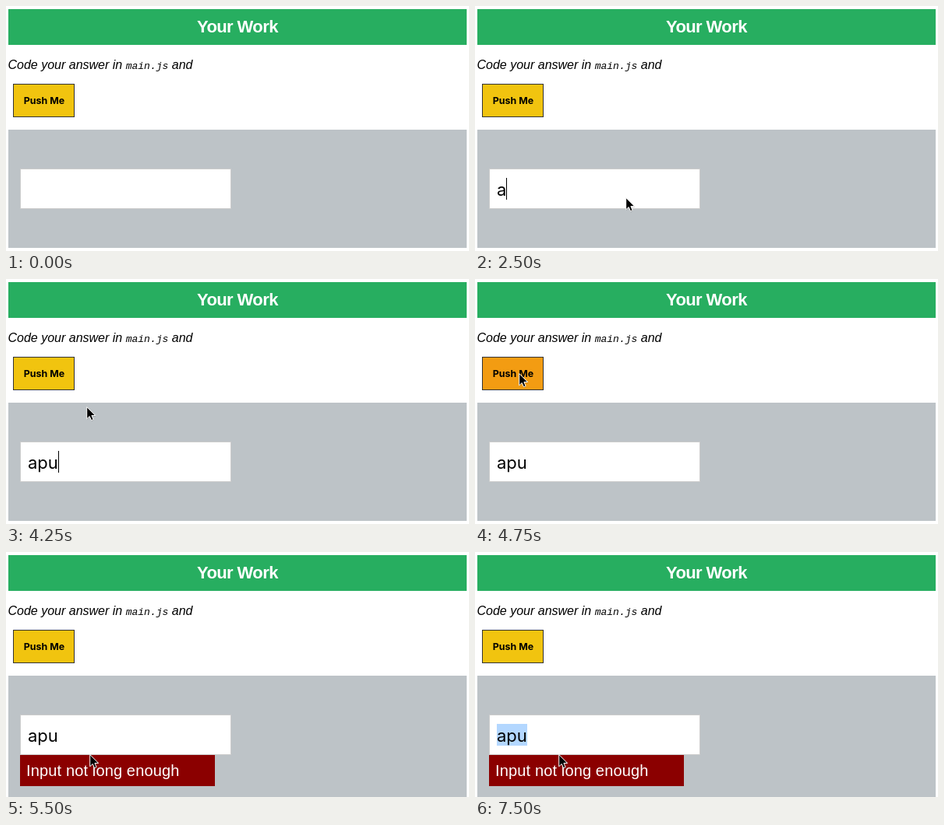
Recreate the animation shown at these times as an HTML page. Size 594 by 315 pixels, loop 8000 ms.

```html
<!DOCTYPE html>
<html lang="en">
<head>
<meta charset="utf-8">
<title>Your Work</title>
<style>
  html, body { margin: 0; width: 100%; height: 100%; overflow: hidden; background: #fff; }
  svg { display: block; width: 594px; height: 315px; }
  text { font-family: "Liberation Sans", Arial, sans-serif; white-space: pre; }
  .ui { font-family: Inter, "Liberation Sans", sans-serif; }
  .title { font-size: 22px; font-weight: 700; letter-spacing: -.6px; fill: #fff; }
  .task { font-size: 16px; font-style: italic; }
  .code { font-family: "Liberation Mono", monospace; font-size: 13px; }
  .label { font-size: 12.4px; font-weight: 700; }
  .typed { font-size: 22px; }
  .error { font-size: 20px; letter-spacing: .14px; fill: #fff; }
</style>
</head>
<body>
<svg viewBox="0 0 594 315">
  <rect x="3" y="4" width="588" height="46" fill="#27ae60"/>
  <text class="title" x="245" y="34">Your Work</text>
  <text class="task" x="2.5" y="81">Code your answer in <tspan class="code">main.js</tspan> and</text>

  <rect id="button" x="9.5" y="100.5" width="78" height="42" fill="#f1c40f" stroke="#333"/>
  <text class="ui label" x="22.8" y="126">Push Me</text>

  <rect id="panel" x="3" y="159" width="588" height="152" fill="#bdc3c7"/>
  <rect x="18.5" y="209.5" width="270" height="51" fill="#fff" stroke="#ccc"/>
  <rect id="selection" x="28" y="221" width="39" height="28" fill="#b3d7ff"/>
  <text id="typed" class="ui typed" x="28" y="244"></text>
  <rect id="caret" y="221" width="1" height="28"/>

  <g id="error">
    <rect x="18" y="261" width="250" height="40" fill="#8b0000"/>
    <text class="error" x="26" y="288">Input not long enough</text>
  </g>

  <g id="cursor">
    <path d="M1 1.5V17l3.6-3.4 2.4 5.2 2.4-1-2.2-5.1H12.5Z" fill="#000" opacity=".2"/>
    <path d="M.7.5V15.8l3.5-3.3 2.3 5.2 2.6-1.1-2.2-5.1h4.8Z" fill="#000" stroke="#fff"/>
  </g>
</svg>
<script>
  const LOOP = 8000;
  const CARET_X = [28, 40, 54, 67];

  // Each step holds until the next and changes only what it lists.
  const steps = [
    [0, { cursor: null, text: "", caret: false, hover: false, error: false, selected: false }],
    [500, { cursor: [300, 142] }],
    [750, { cursor: [212, 231] }],
    [1000, { cursor: [208, 231] }],
    [1250, { cursor: [208, 232] }],
    [1500, { cursor: [193, 246], caret: true }],
    [2000, { caret: false }],
    [2500, { text: "a", caret: true }],
    [2750, { text: "ap" }],
    [3250, { text: "apu" }],
    [3750, { caret: false }],
    [4000, { cursor: [169, 236] }],
    [4250, { cursor: [103, 164], caret: true }],
    [4500, { cursor: [56, 121], hover: true }],
    [4750, { caret: false }],
    [5000, { error: true }],
    [5500, { cursor: [107, 260], hover: false }],
    [6000, { caret: true }],
    [6250, { caret: false, selected: true }]
  ];

  const el = id => document.getElementById(id);
  const show = (id, on) => el(id).setAttribute("visibility", on ? "visible" : "hidden");

  function stateAt(time) {
    return Object.assign({}, ...steps.filter(([start]) => start <= time).map(step => step[1]));
  }

  function draw() {
    const s = stateAt(performance.now() % LOOP);
    show("cursor", s.cursor);
    if (s.cursor) el("cursor").setAttribute("transform", `translate(${s.cursor})`);
    el("typed").textContent = s.text;
    el("caret").setAttribute("x", CARET_X[s.text.length]);
    show("caret", s.caret);
    show("selection", s.selected);
    show("error", s.error);
    el("button").setAttribute("fill", s.hover ? "#f39c12" : "#f1c40f");
    el("panel").setAttribute("height", s.error ? 156 : 152);
    requestAnimationFrame(draw);
  }
  draw();
</script>
</body>
</html>
```
